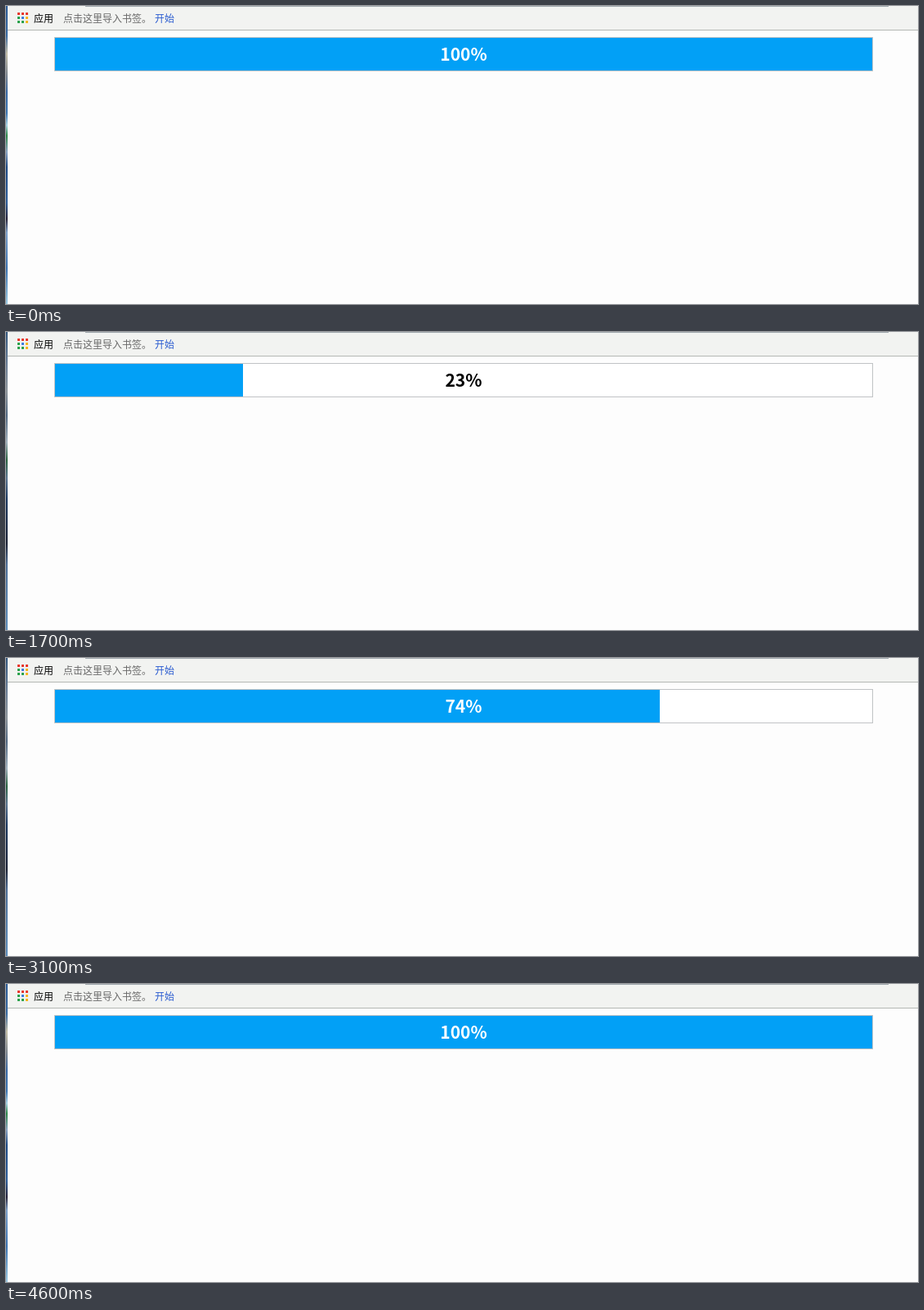
An HTML page that plays this animation: 1116x365 px, repeating every 4.7 s.

```html
<!DOCTYPE html>
<html lang="zh-CN">
<head>
<meta charset="utf-8">
<title>进度条</title>
<style>
  html, body { margin: 0; width: 100%; height: 100%; overflow: hidden; background: #fdfdfd; }
  svg { display: block; font: 12px "Noto Sans CJK SC", "Noto Sans CJK", sans-serif; }
  rect { shape-rendering: crispEdges; }
  #label { font-size: 21px; font-weight: 700; text-anchor: middle; }
  .off { fill: #9d9b95; }
</style>
</head>
<body>
<svg width="1116" height="365" viewBox="0 0 1116 365">
  <defs>
    <linearGradient id="bright" x2="0" y2="1">
      <stop offset="0" stop-color="#2d5c96"/>
      <stop offset=".1" stop-color="#3b6ca4"/>
      <stop offset=".16" stop-color="#c5bfa8"/>
      <stop offset=".23" stop-color="#7f8790"/>
      <stop offset=".29" stop-color="#3a6aa6"/>
      <stop offset=".36" stop-color="#3f78b4"/>
      <stop offset=".4" stop-color="#a9d4e6"/>
      <stop offset=".435" stop-color="#2f8a4a"/>
      <stop offset=".49" stop-color="#8aa4c4"/>
      <stop offset=".54" stop-color="#1f4b86"/>
      <stop offset=".66" stop-color="#2f5f9c"/>
      <stop offset=".715" stop-color="#27233a"/>
      <stop offset=".76" stop-color="#7ea2cc"/>
      <stop offset=".88" stop-color="#3d74b2"/>
      <stop offset="1" stop-color="#9ccbe4"/>
    </linearGradient>
    <linearGradient id="dim" x2="0" y2="1">
      <stop offset="0" stop-color="#34587f"/>
      <stop offset=".12" stop-color="#71839a"/>
      <stop offset=".2" stop-color="#8f969c"/>
      <stop offset=".28" stop-color="#536a84"/>
      <stop offset=".37" stop-color="#a3b3c0"/>
      <stop offset=".43" stop-color="#2b6442"/>
      <stop offset=".49" stop-color="#5c7692"/>
      <stop offset=".56" stop-color="#1d3a62"/>
      <stop offset=".71" stop-color="#1d2336"/>
      <stop offset=".78" stop-color="#4f7099"/>
      <stop offset="1" stop-color="#5f8fbd"/>
    </linearGradient>
  </defs>

  <rect width="1116" height="365" fill="#fdfdfd"/>
  <rect x="2" width="1114" height="29" fill="#f2f3f1"/>
  <rect x="97" width="983" height="1" fill="#a0a8ad"/>
  <rect x="2" y="29" width="1114" height="1" fill="#b4b7b4"/>
  <rect id="edge" width="2" height="365"/>
  <g id="apps"></g>
  <text x="34" y="20">应用</text>
  <text x="70" y="20" fill="#686868">点击这里导入书签。</text>
  <text x="182" y="20" fill="#2a5bd0">开始</text>

  <rect x="59" y="38" width="1002" height="42" fill="#c0c3c5"/>
  <rect x="60" y="39" width="1000" height="40" fill="#fff"/>
  <rect id="fill" x="60" y="39" height="40" fill="#02a0f6"/>
  <text id="label" x="560" y="67"></text>

  <g id="menu">
    <rect x="926" y="151" width="190" height="214" fill="#b9b9b9"/>
    <rect x="927" y="152" width="189" height="213" fill="#fdfdfd"/>
    <rect id="hover" x="927" y="202" width="189" height="24" fill="#ebebeb"/>
    <rect x="927" y="231" width="189" height="1" fill="#e9e9e9"/>
    <rect x="927" y="338" width="189" height="1" fill="#e9e9e9"/>
    <g class="off">
      <text x="953" y="171">返回(B)</text>
      <text x="1085" y="171">Alt+</text><text x="1110" y="171">向左箭头</text>
      <text x="953" y="195">前进(F)</text>
      <text x="1085" y="195">Alt+</text><text x="1110" y="195">向右箭头</text>
    </g>
    <text x="953" y="219">重新加载(R)</text>
    <text x="953" y="254">另存为(A)...</text>
    <text x="953" y="278">打印(P)...</text>
    <text x="953" y="302">投射(C)...</text>
    <text x="953" y="326">翻成中文（简体）(T)</text>
    <text x="953" y="361">查看网页源代码(V)</text>
  </g>
</svg>
<script>
  const LOOP = 4700, STEP = 100, RELOAD = 1100;
  const $ = id => document.getElementById(id);
  const edge = $('edge'), fill = $('fill'), label = $('label'), menu = $('menu'), hover = $('hover');

  const red = '#e8392f', green = '#2ba24c', blue = '#3f7de0', yellow = '#f6b51e';
  [red, red, red, green, blue, yellow, green, green, yellow].forEach((color, i) => {
    const dot = document.createElementNS(fill.namespaceURI, 'rect');
    const attrs = { x: 14 + i % 3 * 5, y: 8 + Math.floor(i / 3) * 5, width: 3, height: 3, fill: color };
    for (const key in attrs) dot.setAttribute(key, attrs[key]);
    $('apps').append(dot);
  });

  // The bar gains about 3.63 points per tick after the reload.
  function percent(t) {
    if (t < RELOAD) return 100;
    const tick = Math.floor((t - RELOAD) / STEP);
    return Math.min(100, Math.floor(1.6 + 3.63 * tick));
  }

  function draw(t) {
    const p = percent(t);
    fill.setAttribute('width', p * 10);
    label.textContent = p + '%';
    label.setAttribute('fill', p >= 50 ? '#fff' : '#000');
    edge.setAttribute('fill', t >= 300 && t < 4600 ? 'url(#dim)' : 'url(#bright)');
    menu.setAttribute('opacity', t < 300 || t >= RELOAD ? 0 : t < 400 ? 0.5 : 1);
    hover.setAttribute('opacity', t >= 800 ? 1 : 0);
  }

  const start = performance.now();
  function frame() {
    draw((performance.now() - start) % LOOP);
    requestAnimationFrame(frame);
  }
  frame();
</script>
</body>
</html>
```
